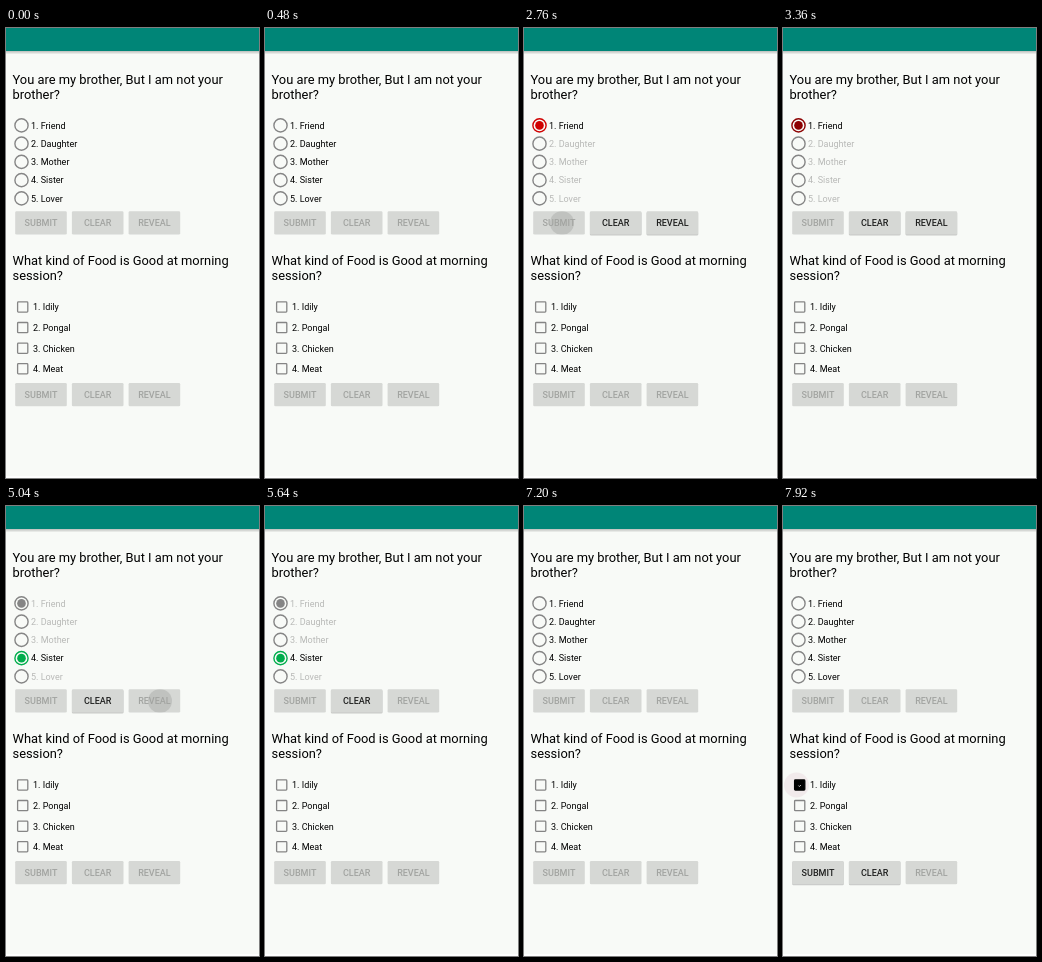
An HTML page that plays this animation: 253 by 450 pixels, repeating every 8000 ms.

```html
<!DOCTYPE html>
<html lang="en">
<head>
<meta charset="utf-8">
<title>Quiz</title>
<style>
  html, body { margin: 0; width: 100%; height: 100%; overflow: hidden; background: #fff; }
  svg { display: block; width: 100vw; height: 100vh; font-family: Roboto, sans-serif; }
  .title { font-size: 12.9px; font-weight: 500; fill: #fff; }
  .question { font-size: 12.88px; }
  .option { font-size: 9.02px; }
  .label { font-size: 9.02px; font-weight: 500; text-anchor: middle; }
</style>
</head>
<body>
<svg id="stage" viewBox="0 0 253 450" xmlns="http://www.w3.org/2000/svg">
  <defs>
    <linearGradient id="shade" x2="0" y2="1">
      <stop offset="0" stop-color="#000" stop-opacity=".24"/>
      <stop offset="1" stop-color="#000" stop-opacity="0"/>
    </linearGradient>
  </defs>
  <rect width="253" height="448" fill="#f8faf7"/>
  <rect y="23" width="253" height="3.5" fill="url(#shade)"/>
  <rect width="253" height="23" fill="#008577"/>
</svg>
<script>
const LOOP = 8000, STEP = 120;
const INK = '#000', GREY = '#858585', FADED = '#b8b9b7', GREEN = '#00ad4c';
const stage = document.getElementById('stage');

function add(tag, attrs, text, parent = stage) {
  const el = document.createElementNS('http://www.w3.org/2000/svg', tag);
  set(el, attrs);
  if (text) el.textContent = text;
  parent.appendChild(el);
  return el;
}
function set(el, attrs) {
  for (const key in attrs) el.setAttribute(key, attrs[key]);
}
const clamp = v => Math.max(0, Math.min(1, v));
const part = (t, from, to) => clamp((t - from) / (to - from));
const mix = (a, b, u) => a + (b - a) * u;

function addLines(lines, y) {
  lines.forEach((line, i) => add('text', { class: 'question', x: 6.5, y: y + i * 15.1 }, line));
}

function addButtons(y, group) {
  return ['SUBMIT', 'CLEAR', 'REVEAL'].map((name, i) => {
    const x = 9.2 + i * 56.7;
    const box = { x, y, width: 51.6, height: 23.4, rx: 1.3 };
    const shadow = add('rect', { ...box, y: y + 0.9, fill: '#000', opacity: 0 });
    add('rect', { ...box, fill: '#d6d8d5' });
    const clip = add('clipPath', { id: group + i });
    add('rect', box, '', clip);
    const ripple = add('circle', { cy: y + 11.9, r: 0, fill: '#000', 'clip-path': `url(#${group + i})` });
    const label = add('text', { class: 'label', x: x + 25.8, y: y + 15.1 }, name);
    return { shadow, ripple, label };
  });
}

function enable(button, on) {
  set(button.label, { fill: on ? '#202120' : '#a2a4a1' });
  set(button.shadow, { opacity: on ? 0.2 : 0 });
}

function press(button, cx, t, start) {
  const u = part(t, start, start + 600);
  set(button.ripple, { cx, r: mix(12, 34, u), opacity: t < start ? 0 : 0.1 * (1 - u) });
}

addLines(['You are my brother, But I am not your', 'brother?'], 56.3);
addLines(['What kind of Food is Good at morning', 'session?'], 236.7);

const radioRipple = add('circle', { cx: 18.2, cy: 97.4, r: 10, fill: '#e9dcdd' });
const radios = ['Friend', 'Daughter', 'Mother', 'Sister', 'Lover'].map((name, i) => {
  const cy = 97.4 + i * 18.25;
  return {
    ring: add('circle', { cx: 15.5, cy, r: 6.6, fill: 'none', 'stroke-width': 1.4 }),
    dot: add('circle', { cx: 15.5, cy, r: 0 }),
    text: add('text', { class: 'option', x: 25, y: cy + 3.3 }, `${i + 1}. ${name}`)
  };
});
const top3 = addButtons(183.2, 'a');

const checkRipple = add('circle', { cx: 13.5, cy: 279, r: 11, fill: '#eee3e5' });
const boxes = ['Idily', 'Pongal', 'Chicken', 'Meat'].map((name, i) => {
  const cy = 279 + i * 20.6;
  add('text', { class: 'option', x: 27, y: cy + 3.3 }, `${i + 1}. ${name}`);
  return add('rect', {
    x: 11.6, y: cy - 5.1, width: 10.2, height: 10.2, rx: 0.8,
    fill: 'none', stroke: GREY, 'stroke-width': 1.3
  });
});
const tick = add('path', {
  d: 'M15.5 279.6l.9.9 1.5-1.5', fill: 'none', stroke: '#fff', 'stroke-width': 0.8
});
const low3 = addButtons(354.9, 'b');

function paintRadio(radio, color, size, text, ring = color) {
  set(radio.ring, { stroke: ring });
  set(radio.dot, { fill: color, r: 4.3 * size });
  set(radio.text, { fill: text });
}

function draw(time) {
  const t = Math.floor(time / STEP) * STEP;
  const picked = t >= 1560 && t < 6720;
  const sent = t >= 2760 && t < 6720;
  const shown = t >= 5040 && t < 6720;

  radios.forEach(radio => paintRadio(radio, GREY, 0, sent ? FADED : INK));
  const [friend, , , sister] = radios;
  if (shown) {
    paintRadio(friend, GREY, 1, FADED);
    paintRadio(sister, GREEN, 1, INK);
  } else if (sent) {
    const red = `rgb(${mix(208, 140, part(t, 2760, 3360))},0,0)`;
    paintRadio(friend, red, 1, INK);
  } else if (picked) {
    paintRadio(friend, INK, part(t, 1560, 1920), INK);
  } else if (t >= 6720) {
    paintRadio(sister, GREY, 1 - part(t, 6720, 7080), INK);
  }
  set(radioRipple, { opacity: t < 1560 ? 0 : 1 - part(t, 1560, 2040) });

  enable(top3[0], picked && !sent);
  enable(top3[1], picked);
  enable(top3[2], sent && !shown);
  press(top3[0], 38, t, 2760);
  press(top3[2], 154, t, 5040);

  const checked = t >= 7800, full = t >= 7920;
  enable(low3[0], checked);
  enable(low3[1], checked);
  enable(low3[2], false);
  set(boxes[0], {
    stroke: checked ? INK : GREY,
    fill: full ? INK : 'none',
    'stroke-width': checked && !full ? 2 : 1.3
  });
  set(tick, { opacity: full ? 1 : 0 });
  set(checkRipple, { opacity: checked ? 0.7 : 0, r: full ? 12.5 : 10 });
}

const start = performance.now();
function loop() {
  draw((performance.now() - start) % LOOP);
  requestAnimationFrame(loop);
}
draw(0);
loop();
</script>
</body>
</html>
```
